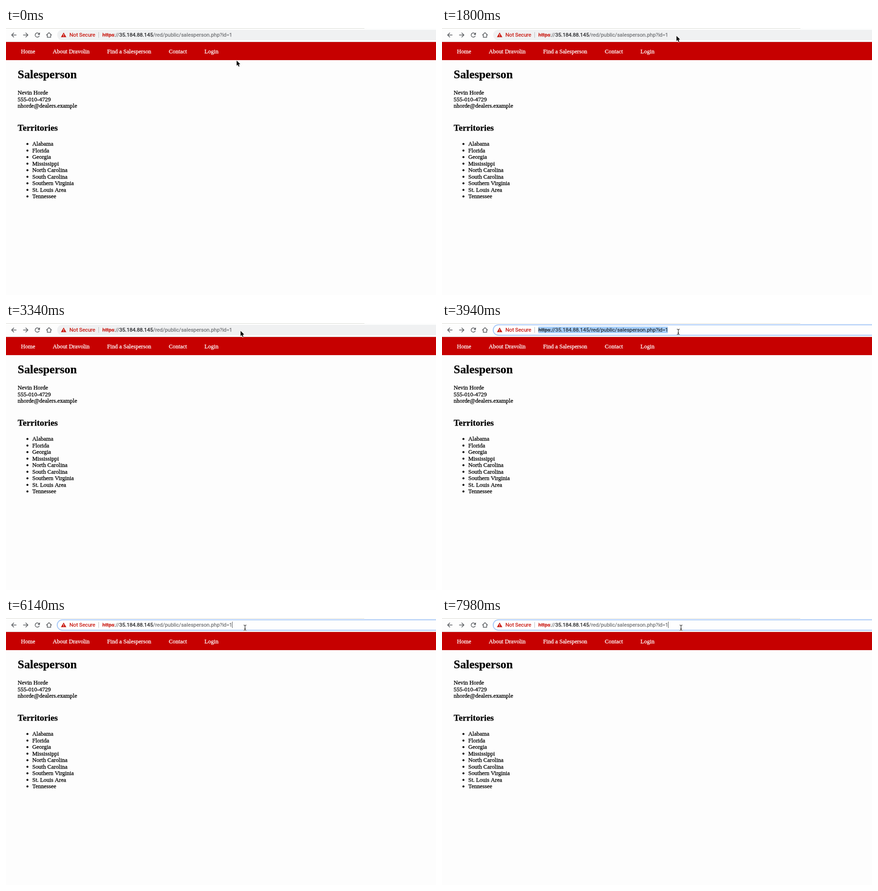
Write an HTML page with a canvas that moves like this. It is 949x590 px and loops after 8 s.

```html
<!DOCTYPE html>
<html lang="en">
<head>
<meta charset="utf-8">
<title>Salesperson page</title>
<style>
  html, body { margin: 0; width: 100%; height: 100%; overflow: hidden; background: #fdfdfd; }
  canvas { display: block; }
</style>
</head>
<body>
<canvas id="stage" width="949" height="590"></canvas>
<script>
const ctx = document.getElementById('stage').getContext('2d');
const W = 949, H = 590, LOOP = 8000;
const FOCUS_AT = 3500, DESELECT_AT = 5900;
const SERIF = '"Liberation Serif", "Times New Roman", serif';
const EM = 12.9, ROW = 14.5, MARGIN = 25.8, BAR = 15.5;
const UI = '11.6px Roboto, sans-serif';
const BODY = `${EM}px ${SERIF}`;
const RED = '#c60000', ICON = '#55585c', WARN = '#c91a12', GREY = '#737578';

const NAV = ['Home', 'About Dravolin', 'Find a Salesperson', 'Contact', 'Login'];
const CONTACT = ['Nevin Horde', '555-010-4729', 'nhorde@dealers.example'];
const STATES = ['Alabama', 'Florida', 'Georgia', 'Mississippi', 'North Carolina', 'South Carolina',
  'Southern Virginia', 'St. Louis Area', 'Tennessee'];
const URL_PARTS = [['https', WARN], ['://', GREY], ['35.184.88.145', '#202124'],
  ['/red/public/salesperson.php?id=1', GREY]];

const ease = u => u * u * (3 - 2 * u);
const progress = (t, from, to) => ease(Math.min(1, Math.max(0, (t - from) / (to - from))));
// Drift out and back between two times
const swing = (t, from, to) => Math.sin(Math.PI * progress(t, from, to));

function pointerAt(t) {
  const rise = progress(t, 80, 820), settle = progress(t, 1040, 1560);
  const focus = progress(t, 3300, 3600), leave = progress(t, 4200, 4880);
  return [
    509 + 6.5 * rise + 2 * settle + 4 * focus + 6 * leave + 3 * (swing(t, 1040, 1560) + swing(t, 4200, 4880)),
    72 - 48 * rise - 6.5 * settle + 2 * focus + 2 * leave
  ];
}

function rect(x, y, w, h, color) {
  ctx.fillStyle = color;
  ctx.fillRect(x, y, w, h);
}

// Draws slightly heavy text and returns its right edge
function text(str, x, y, font, color) {
  ctx.font = font;
  ctx.fillStyle = ctx.strokeStyle = color;
  ctx.lineWidth = 0.3;
  ctx.fillText(str, x, y);
  ctx.strokeText(str, x, y);
  return x + ctx.measureText(str).width;
}

function trace(points) {
  ctx.beginPath();
  points.forEach(([x, y]) => ctx.lineTo(x, y));
}

function line(points, color = ICON, width = 1.5) {
  trace(points);
  ctx.strokeStyle = color;
  ctx.lineWidth = width;
  ctx.stroke();
}

function shape(points, fill) {
  trace(points);
  ctx.fillStyle = fill;
  ctx.fill();
}

function disc(x, y, r, fill) {
  ctx.beginPath();
  ctx.arc(x, y, r, 0, Math.PI * 2);
  ctx.fillStyle = fill;
  ctx.fill();
}

function at(x, y, paint) {
  ctx.save();
  ctx.translate(x, y);
  paint();
  ctx.restore();
}

function arrow(dir) {
  line([[-5.5 * dir, 0], [5 * dir, 0]]);
  line([[0, -5], [5 * dir, 0], [0, 5]]);
}

function reload() {
  ctx.beginPath();
  ctx.arc(0, 0, 4.7, 0.35, Math.PI * 1.77);
  ctx.strokeStyle = ICON;
  ctx.lineWidth = 1.5;
  ctx.stroke();
  shape([[5.7, -5.7], [5.7, -0.6], [0.6, -0.6]], ICON);
}

function home() {
  line([[-6, 0.5], [0, -5.3], [6, 0.5]]);
  line([[-3.7, -0.7], [-3.7, 5], [3.7, 5], [3.7, -0.7]]);
}

function warning() {
  shape([[0, -5.5], [6, 4.8], [-6, 4.8]], WARN);
  rect(-0.6, -2, 1.2, 3.3, '#fff');
  rect(-0.6, 2.3, 1.2, 1.2, '#fff');
}

function address(focused, selected) {
  ctx.beginPath();
  ctx.roundRect(113, 4, W, 23, 11.5);
  ctx.fillStyle = focused ? '#fefefe' : '#f0f1f2';
  ctx.fill();
  if (focused) {
    ctx.strokeStyle = '#a6c8f8';
    ctx.lineWidth = 2;
    ctx.stroke();
  }
  at(127.2, BAR, warning);
  text('Not Secure', 140, 19.4, UI, WARN);
  rect(204, 9, 1, 12.5, '#b9bbbe');

  let x = 212.5;
  if (selected) rect(x, 8, 286, 14.5, '#a8d0fa');
  for (const [str, color] of URL_PARTS) {
    const ink = selected ? '#26303a' : color;
    const end = text(str, x, 19.4, UI, ink);
    if (str === 'https') line([[x, 15.8], [end, 15.8]], ink, 1);
    x = end;
  }
  if (focused && !selected) rect(499, 8, 1, 14, ICON);
}

function toolbar(focused, selected) {
  rect(0, 0, 791, 1, '#d8dad3');
  rect(0, 30, W, 1, '#d9d0d0');
  [() => arrow(-1), () => arrow(1), reload, home].forEach((icon, i) => at(17.5 + i * 25.8, BAR, icon));
  address(focused, selected);
}

function rows(list, x, y, bullets) {
  for (const str of list) {
    text(str, x, y, BODY, '#000');
    if (bullets) disc(x - 10.7, y - 3.7, 2.2, '#000');
    y += ROW;
  }
}

function page() {
  rect(0, 31, W, 40, RED);
  let x = 33;
  for (const label of NAV) x = text(label, x, 56, BODY, '#fff') + 3 * EM;
  text('Salesperson', MARGIN, 111.3, `bold ${2 * EM}px ${SERIF}`, '#000');
  rows(CONTACT, MARGIN, 147);
  text('Territories', MARGIN, 227.3, `bold ${1.5 * EM}px ${SERIF}`, '#000');
  rows(STATES, 58, 260, true);
}

function pointer() {
  const outline = [[0, 0], [0, 11.3], [2.6, 9], [4.4, 13.2], [6.3, 12.4], [4.5, 8.3], [8, 8], [0, 0]];
  ctx.lineJoin = 'round';
  line(outline, '#fff', 2);
  shape(outline, '#000');
}

function beam() {
  for (const [color, width] of [['#fff', 2.4], ['#111', 1.1]]) {
    line([[0, -5], [0, 5]], color, width);
    line([[-1.5, 2.5], [1.5, 2.5]], color, width);
    for (const s of [-1, 1]) line([[-3, 6 * s], [0, 5 * s], [3, 6 * s]], color, width);
  }
}

function draw(t) {
  const focused = t >= FOCUS_AT;
  rect(0, 0, W, H, '#fdfdfd');
  toolbar(focused, focused && t < DESELECT_AT);
  page();
  at(...pointerAt(t), focused ? beam : pointer);
}

const start = performance.now();
function tick() {
  draw((performance.now() - start) % LOOP);
  requestAnimationFrame(tick);
}
tick();
</script>
</body>
</html>
```
